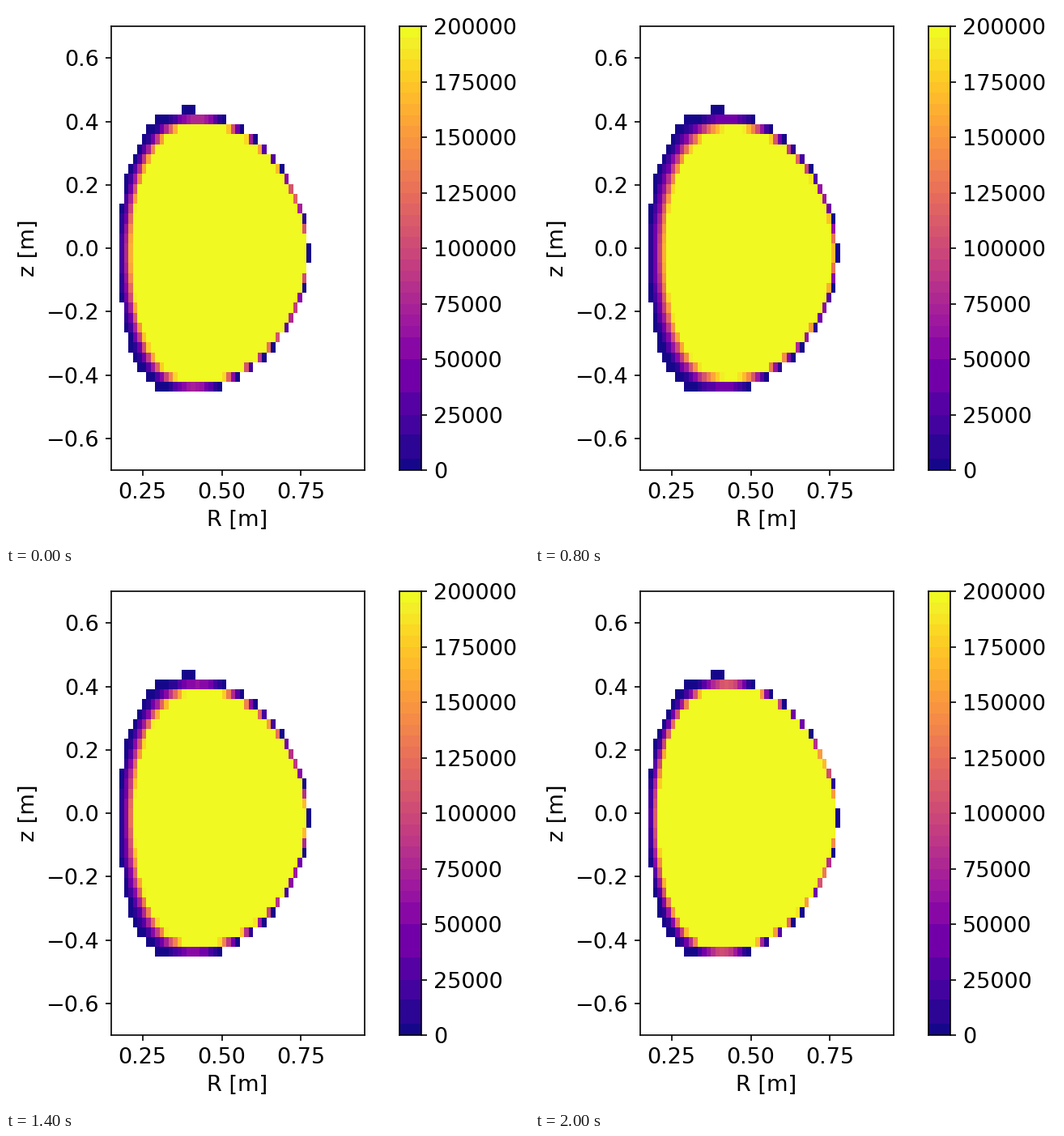
A matplotlib script that plays this animation: 646x663 px, repeating every 2.1 s.

```python
import numpy as np
import matplotlib.pyplot as plt
from matplotlib.animation import FuncAnimation
from matplotlib.colors import BoundaryNorm, ListedColormap

W, H, DPI = 646, 663, 128
FRAMES, STEP = 21, 100
PT = 150 / DPI  # sizes below are in points at 150 dpi

plt.rcParams.update({
    "font.family": "DejaVu Sans",
    "font.size": 13 * PT,
    "axes.linewidth": 0.8 * PT,
    "axes.labelpad": 4 * PT,
})
for axis in ("xtick", "ytick"):
    plt.rcParams.update({
        f"{axis}.major.size": 3.5 * PT,
        f"{axis}.major.width": 0.8 * PT,
        f"{axis}.major.pad": 3.5 * PT,
    })


def solovev(r, z, inner, outer, k, d):
    """Solov'ev flux: positive inside the plasma, zero on its edge."""
    z = z + 0.015
    x = (r - 0.075 * z**3) ** 2
    return (x - inner) * (outer - x) - k * z**2 * (x + d)


r = np.linspace(0.1, 1, 65)
z = np.arange(-14, 15) / 32
grid = np.meshgrid(r, z)
outside = solovev(*grid, 0.0307, 0.604, 1.619, 0.012) < 0
core = np.maximum(solovev(*grid, 0.03, 0.6012, 1.575, 0.027), 0)
profile = (core / 0.0053) ** 1.6


def pressure(i):
    # The edge pressure falls and recovers twice in a loop
    level = np.interp(i * STEP, [0, 300, 800, 1100, 1400, 1800, 2000],
                      [78e3, 67e3, 46e3, 94e3, 60e3, 101e3, 112e3])
    return np.ma.array(level * profile, mask=outside)


levels = 1000 * np.r_[0, 5, 16, 25, 35, 50, 60, 65:201:5]
mid = (levels[1:] + levels[:-1]) / 2
cmap = ListedColormap(plt.get_cmap("plasma")(mid / mid[-1]))
norm = BoundaryNorm(levels, len(mid), clip=True)

fig = plt.figure(figsize=(W / DPI, H / DPI), dpi=DPI, facecolor="white")


def add_axes(left, right, top=25.1, bottom=573.1):
    return fig.add_axes([left / W, 1 - bottom / H,
                         (right - left) / W, (bottom - top) / H])


ax = add_axes(129.55, 442.7)
mesh = ax.pcolormesh(r, z, pressure(0), cmap=cmap, norm=norm, shading="nearest")
ax.set(xlim=(0.15, 0.95), ylim=(-0.7, 0.7), xlabel="R [m]", ylabel="z [m]",
       xticks=[0.25, 0.5, 0.75], yticks=np.arange(-3, 4) / 5)
ax.xaxis.set_major_formatter("{x:.2f}")

bar = add_axes(486, 513.4)
bar.pcolormesh([0, 1], levels, mid[:, None], cmap=cmap, norm=norm)
bar.set(xlim=(0, 1), ylim=(0, 200000), xticks=[], yticks=range(0, 200001, 25000))
bar.yaxis.tick_right()
bar.yaxis.set_major_formatter("{x:.0f}")


def update(i):
    mesh.set_array(pressure(i))
    return [mesh]


anim = FuncAnimation(fig, update, frames=FRAMES, interval=STEP,
                     repeat=True, repeat_delay=0, blit=False)
plt.show()
```
